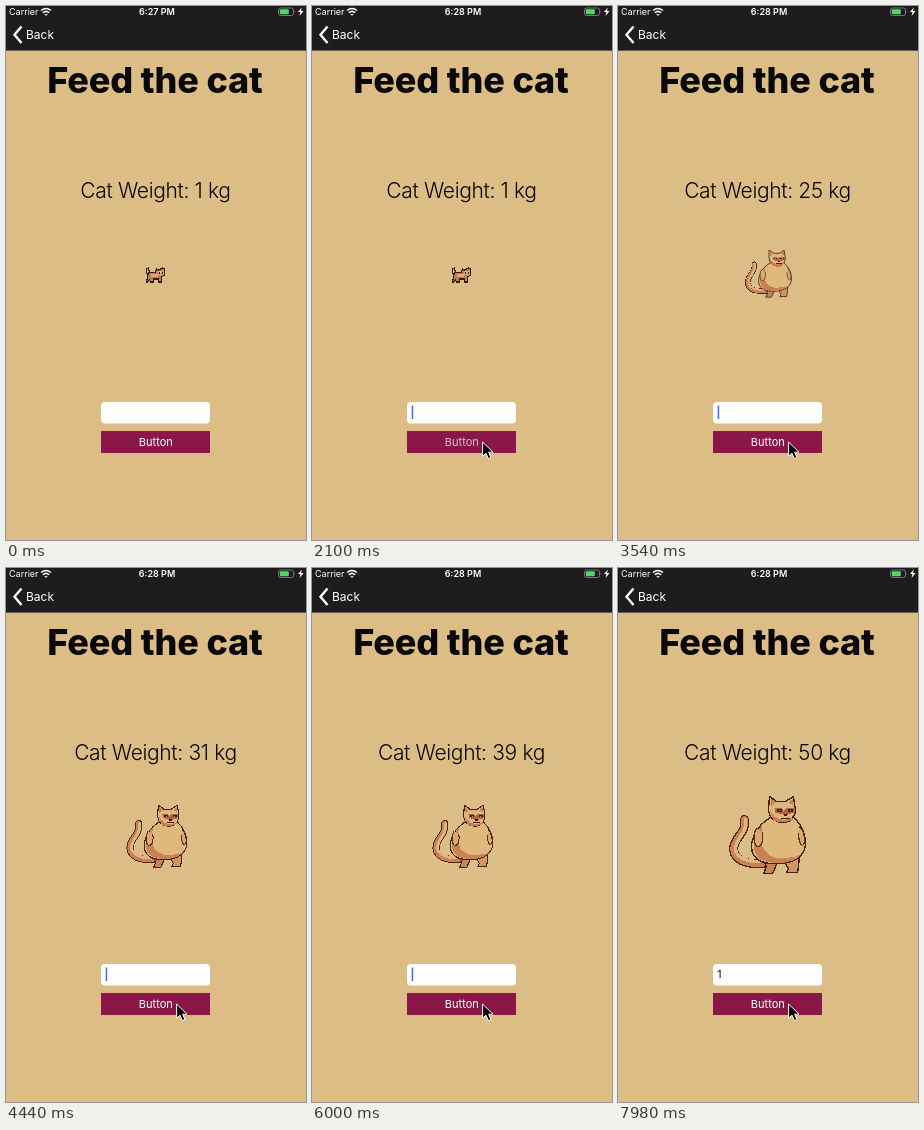
These frames come from a looping animation (300 px wide and 534 px high, 8 s). An HTML page:

```html
<!DOCTYPE html>
<html lang="en">
<head>
<meta charset="utf-8">
<title>Feed the cat</title>
<style>
  html, body { margin: 0; width: 100%; height: 100%; overflow: hidden; background: #dbbd85; }
  svg { display: block; width: 100vw; height: 100vh; }
  text { font-family: Inter, Roboto, sans-serif; fill: #fff; }
  .mid { text-anchor: middle; }
  .status { font-size: 9px; }
  .dark { fill: #0a0808; }
  .cat { shape-rendering: crispEdges; stroke-linejoin: round; stroke-linecap: round; }
</style>
</head>
<body>
<svg viewBox="0 0 300 534" preserveAspectRatio="none">
  <defs>
    <g id="kitten" class="cat">
      <path d="M3 9L1 6V2L3 1L4 6" fill="none" stroke="#382319" stroke-width="1.2"/>
      <path d="M3 6L10 5L11 2L13 3L17 1L19 2V8L16 10V15H13V12L8 12V15H5L4 13L2 15H1Z" fill="#bd7d50" stroke="#302018" stroke-width="1.1"/>
      <path d="M5 7H12V10H5ZM12 4H18V8H12Z" fill="#dfaa75"/>
      <path d="M13 5h1v2h-1zM16 5h1v2h-1z" fill="#251611"/>
    </g>
    <g id="cat" class="cat">
      <g fill="none">
        <path id="tail" d="M16 25C18 40 5 42 5 55C6 66 18 70 34 69" stroke="#4a2b20" stroke-width="9"/>
        <path d="M16 25C18 40 5 42 5 55C6 66 18 70 34 69" stroke="#cb8253" stroke-width="6.5"/>
        <path d="M17 25C19 40 7 43 7 55C8 63 18 67 30 67" stroke="#deb67a" stroke-width="3.5"/>
      </g>
      <g stroke="#40261d" stroke-width="1.4">
        <path d="M33 62L38 72L35 79H44L49 68Z" fill="#cb8253"/>
        <path d="M55 66L60 74L58 78H69L70 72L71 60Z" fill="#d3945f"/>
        <path d="M42 23C31 29 23 41 23 53C24 65 34 70 50 69C66 69 77 61 77 49C77 38 72 29 65 23Z" fill="#dfb97c"/>
      </g>
      <path d="M34 30C23 41 22 58 32 65C44 71 66 70 74 59C65 65 55 62 50 64C38 62 30 52 33 38Z" fill="#cb8253"/>
      <path d="M28 34C24 40 25 50 29 52C34 52 35 44 34 38M71 32C76 37 78 48 74 51C70 49 70 42 70 39" fill="#d9aa6f" stroke="#59301f" stroke-width="1.3"/>
      <path d="M41 2L48 7H57L65 2L67 16Q65 28 54 28Q41 27 40 15Z" fill="#deb679" stroke="#40261d" stroke-width="1.4"/>
      <path d="M42 4L46 8L42 12ZM64 4L60 8L65 11ZM41 15L46 22Q54 28 64 23V25Q54 30 45 26Z" fill="#cb7d4f"/>
      <path d="M46 13H53L55 16L58 13H66V18L59 20H54L47 18Z" fill="#b4643f"/>
      <path d="M48 14H53V17H48ZM59 14H64V17H59ZM55 19H58V21H55ZM52 23H61V24H52Z" fill="#3a211a"/>
      <path d="M50 15h1.5v1.5h-1.5zM61 15h1.5v1.5h-1.5z" fill="#d98b59"/>
    </g>
  </defs>

  <rect width="300" height="534" fill="#dbbd85"/>
  <rect width="300" height="44.6" fill="#1f1c20"/>
  <text class="status" x="3" y="9">Carrier</text>
  <g fill="none" stroke="#fff" stroke-width="1.5">
    <path d="M35 4.5Q40 .5 45 4.5M36.8 6.7Q40 4 43.2 6.7"/>
    <path d="M38.5 8.2L40 9.3L41.5 8.2" fill="#fff" stroke-width=".8"/>
    <path d="M15.5 20.5L8.5 28.8L15.5 37" stroke-width="2.4"/>
  </g>
  <text id="clock" class="status mid" x="151" y="9" font-weight="600"></text>
  <rect x="272.5" y="2" width="15" height="7.5" rx="2" fill="none" stroke="#8c8a8d" stroke-width=".8"/>
  <rect x="273.8" y="3.2" width="9" height="5" rx="1" fill="#4cd964"/>
  <path d="M288.7 4.5Q290 5.7 288.7 7Z" fill="#8c8a8d"/>
  <path d="M295.8 1.5L292 6H294.4L293.6 10L297.5 5H295Z" fill="#fff"/>
  <text x="20" y="33" font-size="12">Back</text>

  <text class="mid dark" x="149" y="87" font-size="36" font-weight="800" letter-spacing="-.15">Feed the cat</text>
  <text id="weight" class="mid dark" x="149.5" y="192.4" font-size="21" font-weight="300" letter-spacing="-.35"></text>
  <use id="pet"/>

  <rect x="95" y="396" width="109" height="21.5" rx="4" fill="#fff"/>
  <text id="entry" class="dark" x="99.3" y="410" font-size="10.5"></text>
  <rect id="caret" y="399.5" width="1.5" height="13.5" fill="#4869ef"/>
  <rect x="95" y="425" width="109" height="22" fill="#8a1748"/>
  <text id="label" class="mid" x="149.8" y="440" font-size="11">Button</text>
  <path id="pointer" d="M0 0V14.2L3.4 11.2L5.7 16.6L8.3 15.5L6 10.2H10.4Z" fill="#000" stroke="#fff" stroke-width="1"/>
</svg>
<script>
  const LOOP = 8000, STEP = 60, FOCUS = 720;
  const $ = id => document.getElementById(id);
  const clamp = (v, lo, hi) => Math.min(hi, Math.max(lo, v));

  // [minimum weight, symbol, x, y, x scale, y scale]
  const stages = [
    [0, 'kitten', 139.5, 261, 1, 1],
    [10, 'cat', 131, 252, .46, .42],
    [20, 'cat', 126.5, 243, .61, .61],
    [30, 'cat', 120, 235.5, .79, .81],
    [40, 'cat', 110.5, 226.5, 1, 1]
  ];
  const entries = [[0, ''], [FOCUS, ''], [1200, '3'], [1440, '30'], [2100, ''],
    [4560, '2'], [4800, '20'], [5580, ''], [7260, '1']];
  const moves = [[60, 310, 425], [600, 170.6, 396], [1740, 170.6, 396], [1920, 170.6, 436], [LOOP, 170.6, 436]];
  const presses = [1980, 5460];

  const latest = (rows, value) => rows.filter(row => row[0] <= value).pop();

  function weightAt(t) {
    const first = clamp(1 + Math.floor((t - 2100) / STEP), 1, 31);
    const second = clamp(Math.floor((t - 5520) / STEP), 0, 19);
    return first + second;
  }

  function pointerAt(t) {
    if (t < moves[0][0]) return [-50, -50];
    const i = moves.findIndex(move => t < move[0]);
    const [t0, x0, y0] = moves[i - 1], [t1, x1, y1] = moves[i];
    const p = (t - t0) / (t1 - t0), e = p * p * (3 - 2 * p);
    return [x0 + (x1 - x0) * e, y0 + (y1 - y0) * e];
  }

  function labelOpacity(t) {
    const press = presses.find(p => t >= p && t < p + 240);
    return press === undefined ? 1 : clamp(.3 + (t - press - 30) / 220, .3, 1);
  }

  function caretOpacity(age) {
    const phase = age % 900;
    return phase < 700 ? clamp((700 - phase) / 80, 0, 1) : clamp((phase - 800) / 90, 0, 1);
  }

  function draw(t) {
    const weight = weightAt(t);
    const [, symbol, x, y, sx, sy] = latest(stages, weight);
    const [changed, typed] = latest(entries, t);
    $('clock').textContent = t < 1380 ? '6:27 PM' : '6:28 PM';
    $('weight').textContent = `Cat Weight: ${weight} kg`;
    $('pet').setAttribute('href', '#' + symbol);
    $('pet').setAttribute('transform', `translate(${x} ${y}) scale(${sx} ${sy})`);
    $('entry').textContent = typed;
    $('caret').setAttribute('x', 99.7 + (typed ? $('entry').getComputedTextLength() : 0));
    $('caret').setAttribute('opacity', t < FOCUS ? 0 : caretOpacity(t - changed));
    $('label').setAttribute('opacity', labelOpacity(t));
    $('pointer').setAttribute('transform', `translate(${pointerAt(t)})`);
  }

  const start = performance.now();
  function tick() {
    const t = (performance.now() - start) % LOOP;
    draw(Math.floor((t + 2) / STEP) * STEP);
    requestAnimationFrame(tick);
  }
  tick();
</script>
</body>
</html>
```
